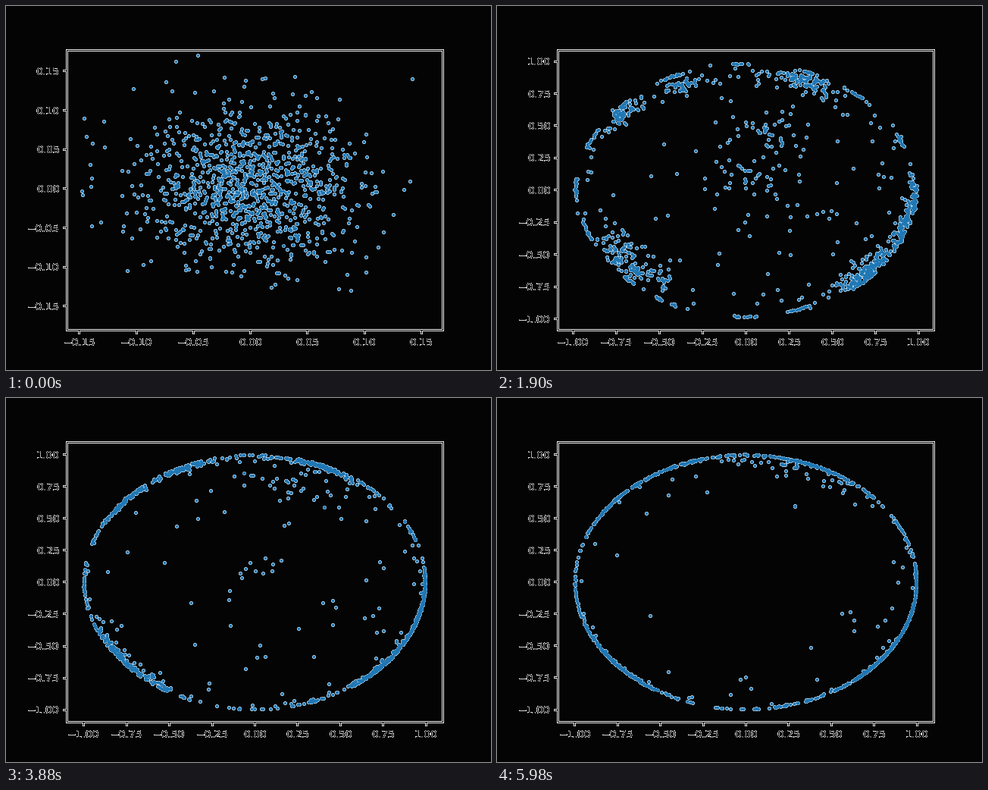
Recreate the animation shown at these times as a matplotlib script. Size 640x480 px, loop 6 s.

```python
import numpy as np
import matplotlib.pyplot as plt
from matplotlib.animation import FuncAnimation

FRAMES = 300
SETTLE = 27  # by now the clusters have separated
rng = np.random.default_rng(11)

# Main clusters when they separate, as centre: number of points
MASSES = {
    .48 - .42j: 165, .20 + .52j: 110, -.38 - .31j: 130, .64 - .18j: 75,
    -.20 + .48j: 45, .81 - .07j: 50, -.45 + .38j: 65, .04 + .14j: 35,
}
RIM_CLUMPS = 16
STRAY, LAGGARDS, LATE = 110, 17, 45


def gauss(n, spread=1.0):
    return spread * (rng.normal(size=n) + 1j * rng.normal(size=n))


def cluster(centre, n):
    return centre + gauss(n, .0023 * n ** .73)


def reach(f):
    """Hyperbolic distance to the left, right, bottom and top edge."""
    first = np.array([.147, .155, .166, .162])
    skew = np.array([.22, -.165, .015, -.27]) * np.exp(-(f / 40) ** 2)
    return first + (1.4 + skew) * np.log1p(f / 20)


def growth(f):
    return 1.4 * np.log1p(f / 20)


def lag(f, tau):
    return 1 / (1 + (f / tau) ** 1.3)


def pace_for(r, f, tau):
    """Pace that brings a point to radius r at time f."""
    rho = np.arctanh(np.clip(r, .01, .88))
    return (rho / growth(f)) ** (1 / lag(f, tau))


groups = [cluster(c, n) for c, n in MASSES.items()]
for k in range(RIM_CLUMPS):
    a = 2 * np.pi * (k + rng.uniform(-.25, .25)) / RIM_CLUMPS
    groups.append(cluster(rng.uniform(.72, .86) * np.exp(1j * a),
                          rng.integers(9, 24)))
groups.append(gauss(STRAY, .36))
crowd = np.concatenate(groups)

# Three kinds of points: the crowd, slow ones, and ones that leave late
tau = np.concatenate([
    170 * np.exp(.3 * rng.normal(size=crowd.size)),
    np.full(LAGGARDS, 500.0),
    np.full(LATE, 150.0),
])
slow = slice(crowd.size, crowd.size + LAGGARDS)
pace = np.full(tau.size, 1e-9)
pace[:crowd.size] = pace_for(np.abs(crowd), SETTLE, tau[:crowd.size])
pace[slow] = pace_for(rng.uniform(.6, .95, LAGGARDS), FRAMES - 1, tau[slow])
theta = np.concatenate([
    np.angle(crowd),
    rng.choice(np.angle(crowd), LAGGARDS),
    rng.uniform(-np.pi, np.pi, LATE),
])
leave = np.full(tau.size, float(FRAMES))
leave[-LATE:] = rng.uniform(50, 260, LATE)
start = gauss(tau.size, .05)
spin = rng.normal(0, .012, tau.size)
drift = rng.normal(0, .12, tau.size)


def positions(f):
    rho = growth(f) * pace ** lag(f, tau) + .05 * np.maximum(f - leave, 0)
    w = 1 - np.exp(-f / 20)
    core = start * np.exp(1j * spin * f) * (1 + w) + w * (.03 + .07j)
    z = rho * np.exp(1j * (theta + drift * f / FRAMES)) + core * np.exp(-3 * rho)
    r = np.abs(z)
    z *= np.tanh(r) / r
    return z.real, z.imag


def matte(img, dpi):
    """Lay soft edges on white and keep untouched pixels clear."""
    a = img[..., 3:]
    out = np.empty_like(img)
    out[..., :3] = img[..., :3] * a + (1 - a)
    out[..., 3:] = a > 0
    return out, 0, 0


plt.rcParams["font.family"] = "DejaVu Sans"
fig = plt.figure(figsize=(6.4, 4.8), dpi=100, facecolor="#040404")
ax = fig.add_axes([.125, .11, .775, .77])
ax.patch.set_visible(False)
ax.set_agg_filter(matte)
dots, = ax.plot(*positions(0), "o", ms=2, color="#1f77b4")


def update(f):
    dots.set_data(*positions(f))
    left, right, bottom, top = np.tanh(reach(f))
    mx, my = .05 * (left + right), .05 * (bottom + top)
    ax.set_xlim(-left - mx, right + mx)
    ax.set_ylim(-bottom - my, top + my)
    return dots,


anim = FuncAnimation(fig, update, frames=FRAMES, interval=20, repeat=True)
plt.show()
```
